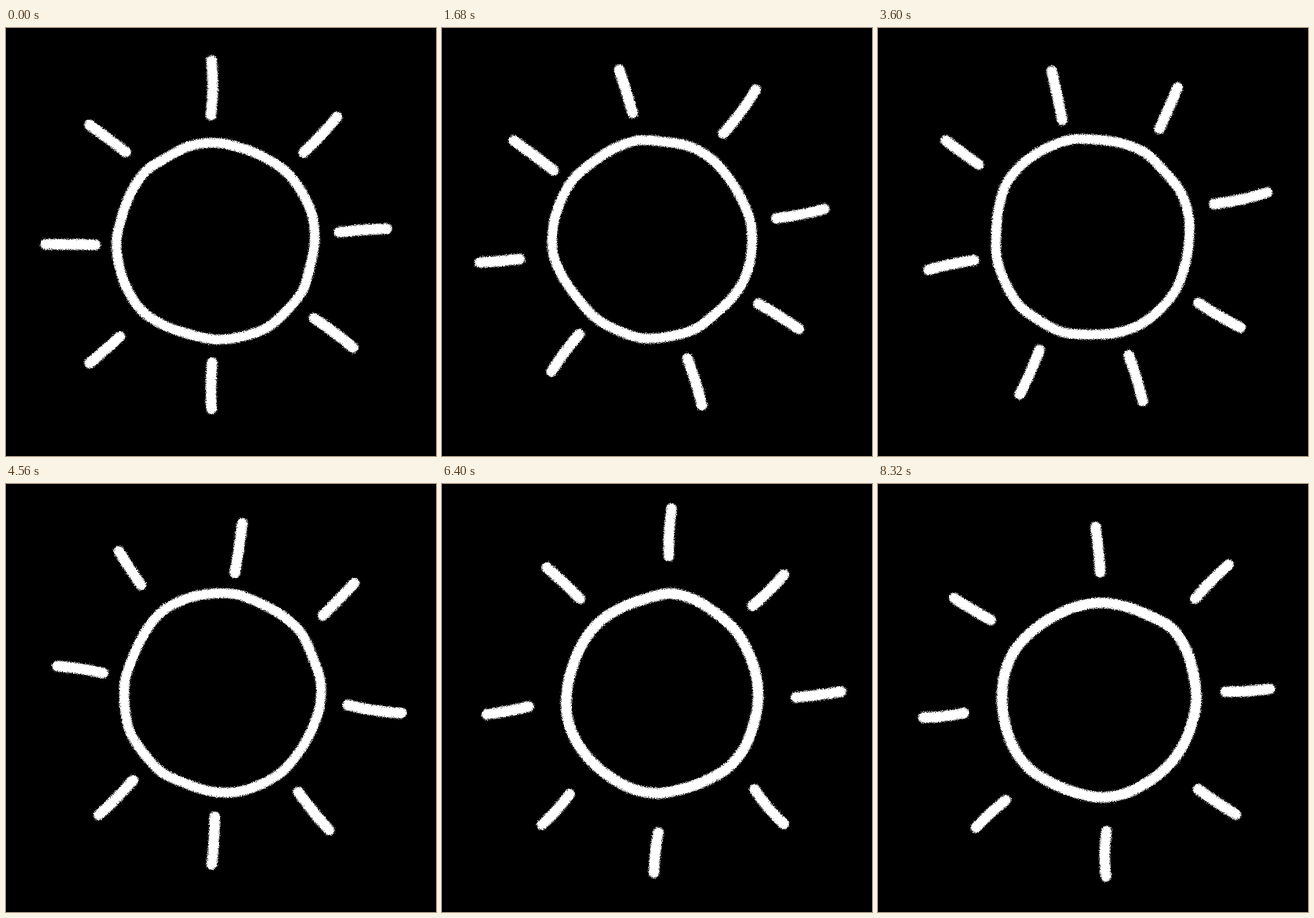
Recreate the animation shown at these times as an HTML page. Size 751 by 746 pixels, loop 8.4 s.

```html
<!DOCTYPE html>
<html lang="en">
<head>
<meta charset="utf-8">
<title>Turning sun</title>
<style>
  html, body { margin: 0; width: 100%; height: 100%; overflow: hidden; background: #000; }
  svg { display: block; width: 100%; height: 100%; }
  path { fill: none; stroke: #fff; stroke-linecap: round; stroke-linejoin: round; }
</style>
</head>
<body>
<svg viewBox="0 0 751 746">
  <filter id="chalk" filterUnits="userSpaceOnUse" x="0" y="0" width="751" height="746" color-interpolation-filters="sRGB">
    <feTurbulence type="fractalNoise" baseFrequency="0.73" numOctaves="1" seed="4" result="grain"/>
    <feDisplacementMap in="SourceGraphic" in2="grain" scale="10" xChannelSelector="R" yChannelSelector="G" result="rough"/>
    <feColorMatrix in="grain" values="0 0 0 0 1  0 0 0 0 1  0 0 0 0 1  0 0 8 0 -0.6" result="specks"/>
    <feComposite in="rough" in2="specks" operator="in"/>
  </filter>
  <rect width="751" height="746" fill="#000"/>
  <g filter="url(#chalk)">
    <g id="sun"><path id="ring"/><path id="rays" stroke-width="18.5"/></g>
  </g>
</svg>
<script>
const STEP_MS = 80, STEPS = 105, STEP_DEG = 180 / STEPS;
const PIVOT = [375.5, 373];
const RING_POINTS = 24, RING_DEG = 360 / RING_POINTS;

// Each sketch: the turn it was drawn at, ring radii from 3 o'clock, rays as outer, middle, inner point.
const upright = {
  turn: 0, width: 17, center: [366, 371],
  radii: [173, 171, 175, 174, 176, 173, 172, 169, 172, 177, 176, 174,
          173, 169, 170, 172, 168.5, 171.5, 171, 168, 168.5, 172, 173, 174.5],
  rays: [
    [[359, 57], [361, 104], [358, 152]],
    [[578, 155], [551, 186], [520, 217]],
    [[665, 350], [622, 352], [582, 356]],
    [[606, 557], [575, 532], [538, 506]],
    [[359, 664], [358, 625], [360, 583]],
    [[146, 584], [172, 562], [199, 538]],
    [[69, 377], [112, 377], [156, 378]],
    [[146, 169], [176, 191], [209, 216]]
  ]
};
const inverted = {
  turn: 104 * STEP_DEG, width: 18.5, center: [387, 377],
  radii: [169, 166, 165.5, 165.5, 165.5, 168.5, 169, 166, 166.5, 171, 171.5, 170,
          170.5, 172, 172, 168.5, 166.5, 168, 170, 169.5, 171, 178, 175, 170],
  rays: [
    [[398, 684], [396, 645], [399, 605]],
    [[171, 599], [196, 574], [223, 551]],
    [[79, 407], [115, 405], [150, 399]],
    [[133, 199], [165, 219], [197, 237]],
    [[380, 75], [385, 115], [388, 154]],
    [[612, 141], [581, 170], [554, 200]],
    [[684, 357], [646, 361], [607, 362]],
    [[625, 576], [592, 555], [559, 532]]
  ]
};

const rad = deg => deg * Math.PI / 180;

function rotate([x, y], deg) {
  const c = Math.cos(rad(deg)), s = Math.sin(rad(deg));
  const dx = x - PIVOT[0], dy = y - PIVOT[1];
  return [PIVOT[0] + dx * c - dy * s, PIVOT[1] + dx * s + dy * c];
}

// Brings a sketch back to zero turn, so that points of different sketches correspond.
function normalize({ turn, width, center, radii, rays }) {
  const shift = Math.round(turn / RING_DEG);
  const ring = radii.map((_, i) => {
    const k = (i + shift) % RING_POINTS, a = rad(k * RING_DEG);
    return rotate([center[0] + radii[k] * Math.cos(a), center[1] + radii[k] * Math.sin(a)], -turn);
  });
  return { width, ring, rays: rays.map(ray => ray.map(p => rotate(p, -turn))) };
}

const mid = (p, q) => [(p[0] + q[0]) / 2, (p[1] + q[1]) / 2];

function between(a, b) {
  return {
    width: (a.width + b.width) / 2,
    ring: a.ring.map((p, i) => mid(p, b.ring[i])),
    rays: a.rays.map((ray, i) => ray.map((p, j) => mid(p, b.rays[i][j])))
  };
}

const fmt = p => p.map(v => v.toFixed(2)).join(" ");

// Closed Catmull-Rom curve as cubic Béziers.
function ringPath(points) {
  const n = points.length, at = i => points[(i + n) % n];
  const handle = (p, from, to, sign) => p.map((v, k) => v + sign * (to[k] - from[k]) / 6);
  return "M" + fmt(at(0)) + points.map((p, i) => {
    const q = at(i + 1);
    return "C" + [handle(p, at(i - 1), q, 1), handle(q, p, at(i + 2), -1), q].map(fmt).join(" ");
  }).join("") + "Z";
}

function rayPath([outer, middle, inner]) {
  const ends = mid(outer, inner);
  const control = middle.map((v, k) => 2 * v - ends[k]);
  return `M${fmt(outer)}Q${fmt(control)} ${fmt(inner)}`;
}

const first = normalize(upright), last = normalize(inverted);
const sketches = [first, between(first, last), last].map(s => ({
  width: s.width, ring: ringPath(s.ring), rays: s.rays.map(rayPath).join("")
}));

const sun = document.getElementById("sun");
const ring = document.getElementById("ring");
const rays = document.getElementById("rays");
let shown = -1;

function render(ms) {
  const step = Math.floor(Math.max(0, ms) / STEP_MS) % STEPS;
  if (step === shown) return;
  shown = step;
  const sketch = sketches[step % sketches.length];
  ring.setAttribute("d", sketch.ring);
  ring.setAttribute("stroke-width", sketch.width);
  rays.setAttribute("d", sketch.rays);
  sun.setAttribute("transform", `rotate(${step * STEP_DEG} ${PIVOT})`);
}

const start = performance.now();
function tick(now) {
  render(now - start);
  requestAnimationFrame(tick);
}
render(0);
requestAnimationFrame(tick);
</script>
</body>
</html>
```
